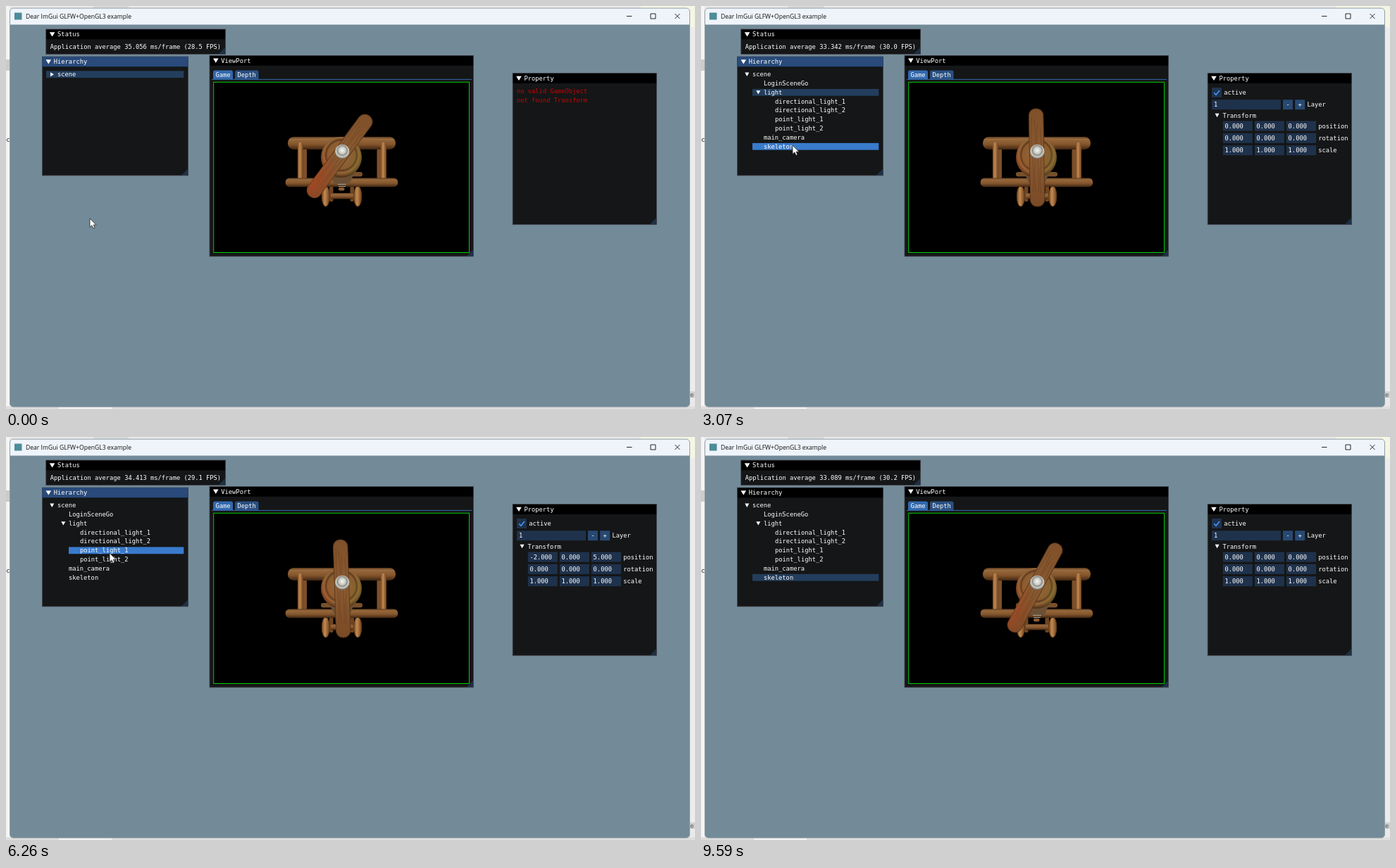
An HTML page that plays this animation: 978x573 px, repeating every 9.69 s.

```html
<!DOCTYPE html>
<html lang="en">
<head>
<meta charset="utf-8">
<title>Scene editor</title>
<style>
html, body { margin: 0; width: 978px; height: 573px; overflow: hidden; background: #e9e9e9; }
svg { display: block; }
text { font: 8.75px "DejaVu Sans Mono", monospace; white-space: pre; }
.caption { font: 8.6px "Open Sans", sans-serif; }
</style>
</head>
<body>
<svg id="stage" width="978" height="573" viewBox="0 0 978 573">
  <defs>
    <linearGradient id="wing" x2="0" y2="1">
      <stop offset="0" stop-color="#5f3d20"/><stop offset=".2" stop-color="#96683c"/>
      <stop offset=".6" stop-color="#84552c"/><stop offset="1" stop-color="#3f2612"/>
    </linearGradient>
    <linearGradient id="post">
      <stop offset="0" stop-color="#7b4b26"/><stop offset=".4" stop-color="#c48a50"/>
      <stop offset="1" stop-color="#6a4020"/>
    </linearGradient>
    <linearGradient id="wood" x2="0" y2="1">
      <stop offset="0" stop-color="#7f5029"/><stop offset=".5" stop-color="#8a5a32"/>
      <stop offset="1" stop-color="#7a4a26"/>
    </linearGradient>
    <radialGradient id="nose" cx=".5" cy=".45" r=".55">
      <stop offset="0" stop-color="#94683a"/><stop offset=".62" stop-color="#8a5c30"/>
      <stop offset=".68" stop-color="#5c3a1c"/><stop offset=".78" stop-color="#97683a"/>
      <stop offset="1" stop-color="#4a2c14"/>
    </radialGradient>
    <radialGradient id="hub" cx=".5" cy=".42" r=".55">
      <stop offset="0" stop-color="#f4f6f2"/><stop offset=".45" stop-color="#c4c6bf"/>
      <stop offset=".6" stop-color="#8d8a82"/><stop offset=".8" stop-color="#d0d2cb"/>
      <stop offset="1" stop-color="#77726a"/>
    </radialGradient>
    <radialGradient id="red" gradientUnits="userSpaceOnUse" cx="412" cy="236" r="58">
      <stop offset="0" stop-color="#d2401c" stop-opacity=".75"/>
      <stop offset="1" stop-color="#d2401c" stop-opacity="0"/>
    </radialGradient>
    <radialGradient id="green" gradientUnits="userSpaceOnUse" cx="543" cy="234" r="62">
      <stop offset="0" stop-color="#6c8420" stop-opacity=".75"/>
      <stop offset="1" stop-color="#6c8420" stop-opacity="0"/>
    </radialGradient>
    <clipPath id="bladeClip"><rect id="bladeMask"/></clipPath>
    <clipPath id="noseClip"><circle cx="476" cy="215" r="29"/></clipPath>
  </defs>
  <g id="desktop"></g>
  <g id="panels"></g>
  <g id="plane"></g>
  <g id="propeller">
    <g id="blade">
      <rect id="bladeBody" fill="url(#wood)" stroke="#5c381b"/>
      <path id="grain" fill="none" stroke="#5a3517" stroke-opacity=".45" stroke-width=".8"/>
    </g>
    <g clip-path="url(#bladeClip)">
      <path d="M350 130H600V300H350Z" fill="url(#red)"/>
      <path d="M350 130H600V300H350Z" fill="url(#green)"/>
    </g>
    <circle cx="477.3" cy="207" r="10.3" fill="url(#hub)"/>
  </g>
  <g id="live"></g>
  <path id="cursor" d="M0 0V12.6L2.9 9.9L4.9 14.3L7 13.4L5.1 9.2H9Z" fill="#fff" stroke="#222" stroke-width=".8"/>
</svg>
<script>
const $ = id => document.getElementById(id);
const LOOP = 9690;
const PANEL = '#151617', FRAME = '#1f324c', BUTTON = '#274972', HEADER = '#233e5d', HOVER = '#397bcc';

const rect = (x, y, w, h, fill, extra = '') =>
  `<rect x="${x}" y="${y}" width="${w}" height="${h}" fill="${fill}" ${extra}/>`;
const path = (d, fill, extra = '') => `<path d="${d}" fill="${fill}" ${extra}/>`;
const label = (x, y, s, fill = '#fff') => `<text x="${x}" y="${y + 3}" fill="${fill}">${s}</text>`;
const arrow = (x, y, open) => path(open
  ? `M${x - 3} ${y - 2.7}h6l-3 5.4Z` : `M${x - 2.3} ${y - 3}v6l5-3Z`, '#fff');
const titleBar = (x, y, w, name, fill = '#000') =>
  rect(x, y, w, 14.3, fill) + path(`M${x + 5} ${y + 4.2}h7.6l-3.8 6.2Z`, '#fff') + label(x + 16.3, y + 7.2, name);

function panel(x, y, w, h, name) {
  const r = x + w, b = y + h;
  return rect(x, y, w, h, PANEL) + titleBar(x, y, w, name) +
    path(`M${r} ${b - 10}V${b}h-10Z`, '#1e3045') +
    rect(x, y, w, h, 'none', 'stroke="#41414b" stroke-width=".8"');
}

$('desktop').innerHTML =
  rect(0, 0, 5, 573, '#f4f4f4') + rect(0, 76, 5, 16, '#cbcbcb') + rect(124, 0, 50, 3, '#d9d9d9') +
  rect(901, 0, 77, 30, '#f5f5e4') + rect(971, 30, 7, 520, '#ececec') + rect(971, 548, 7, 9, '#cfcfcf') +
  rect(0, 569, 978, 4, '#dedede') + rect(75, 570, 75, 3, '#f2f2f2') +
  label(-5, 190, '_c', '#222') + label(971, 553, 'e', '#555') +
  rect(5.5, 3, 965, 567, '#738b98', 'rx="5" stroke="#8b969c" stroke-width=".8"') +
  path('M6 26.5V8Q6 3.4 10.5 3.4H965.5Q970 3.4 970 8V26.5Z', '#eff4fa') +
  rect(12, 9.5, 10.5, 10, '#4d8c98') +
  '<text class="caption" x="28" y="18" fill="#111">Dear ImGui GLFW+OpenGL3 example</text>' +
  path('M881 14.5h7.5M915 11h7v7h-7ZM949.5 11l7 7m0-7l-7 7', 'none', 'stroke="#111" stroke-width=".9"');

$('panels').innerHTML =
  panel(56.8, 33, 254.7, 35.5, 'Status') + panel(51.5, 72, 207, 169, 'Hierarchy') +
  panel(289, 70.4, 374.4, 285.6, 'ViewPort') + panel(719.2, 95.6, 204.3, 215.2, 'Property') +
  path('M294 104V94q0-2.5 2.5-2.5h23q2.5 0 2.5 2.5v10Z', '#3369ad') +
  path('M325 104V94q0-2.5 2.5-2.5h28.5q2.5 0 2.5 2.5v10Z', '#2a5082') +
  rect(292, 103.9, 369, 1, '#3369ad') + label(297.5, 98, 'Game') + label(328.5, 98, 'Depth') +
  rect(294.7, 108.3, 362.8, 242.2, '#000', 'stroke="#04cc04"');

const bar = (x, y, w, h, fill, r = 2) => rect(x, y, w, h, fill, `rx="${r}"`);
const wheel = x => `<ellipse cx="${x}" cy="270.5" rx="5.6" ry="14.6" fill="url(#post)" stroke="#5a3719"/>`;
$('plane').innerHTML =
  bar(447, 236, 59, 6.5, '#76502b', 3) +
  bar(421, 203, 6, 43, '#7c4f29') + bar(526.5, 203, 5.5, 43, '#7c4f29') +
  bar(400, 186, 153, 18, 'url(#wing)', 8.5) +
  path('M404 189.5Q476 187 549 189.5', 'none', 'stroke="#a97a49" stroke-opacity=".6"') +
  bar(414, 194, 7.8, 53, 'url(#post)', 3) + bar(532, 194, 8, 53, 'url(#post)', 3) +
  bar(459, 252, 5.5, 26, '#6f4522') + bar(488.5, 252, 5.5, 26, '#6f4522') +
  bar(461, 266, 32, 8.5, 'url(#wing)') +
  wheel(453.8) + wheel(499.3) +
  bar(396.7, 244.5, 159.5, 12.8, 'url(#wing)', 6) +
  path('M459 238h35l-6 14q-11 3-22 0Z', '#6b5035') +
  path('M471 253.5h12M472 256.5h10', 'none', 'stroke="#aaa69d" stroke-width="1.2"') +
  bar(472, 258, 8.5, 4.5, '#8a5a30') +
  '<circle cx="476" cy="215" r="29" fill="url(#nose)"/>' +
  '<g clip-path="url(#noseClip)">' +
  rect(447, 186, 58, 58, 'url(#red)', 'opacity=".8"') + rect(447, 186, 58, 58, 'url(#green)') + '</g>';

// Time of every picture change: one still, then nine runs of eight steps.
const runs = [[150, 1090], [1210, 2110], [2260, 3200], [3320, 4250], [4370, 5340],
  [5480, 6380], [6530, 7430], [7580, 8570], [8690, 9590]];
const ticks = [0, ...runs.flatMap(([a, b]) => Array.from({ length: 8 }, (_, i) => a + (b - a) * i / 7))];

// time, unwound propeller angle, milliseconds per frame
const spin = [[0, 36.3, 35.056], [1720, 423.8, 33.903], [3070, 720, 33.34], [4370, 1016.2, 33.707],
  [6260, 1440, 34.416], [7430, 1710, 33.856], [9590, 2188.2, 33.089]];
const pointer = [[0, 119, 302], [300, 119, 302], [900, 65, 98], [1250, 65, 98], [1720, 83, 146],
  [2200, 80, 123], [2400, 80, 123], [3070, 130, 198], [3400, 138, 196], [4150, 145, 111], [4370, 145, 111],
  [4850, 145, 124], [5000, 145, 124], [5400, 146, 136], [5750, 147, 149], [6050, 147, 160], [6260, 147, 165],
  [6500, 147, 175], [6900, 145, 187], [7430, 144, 197], [7900, 144, 199], [8450, 152, 335],
  [8650, 152, 335], [9350, 190, 585]];

function sample(keys, t, ease = k => k) {
  const i = keys.findIndex(key => key[0] > t);
  if (i < 0) return keys.at(-1).slice(1);
  const a = keys[i - 1], b = keys[i], k = ease((t - a[0]) / (b[0] - a[0]));
  return a.slice(1).map((v, j) => v + (b[j + 1] - v) * k);
}
const smooth = k => k * k * (3 - 2 * k);

const OPEN_SCENE = 1000, OPEN_LIGHT = 2350, BLUR = 8500;
const nodes = [['scene', 0], ['LoginSceneGo', 1], ['light', 1], ['directional_light_1', 2],
  ['directional_light_2', 2], ['point_light_1', 2], ['point_light_2', 2], ['main_camera', 1], ['skeleton', 1]];
const picks = [[0, 'scene'], [OPEN_LIGHT, 'light'], [4150, 'LoginSceneGo'], [4850, 'light'],
  [5480, 'directional_light_1'], [5800, 'directional_light_2'], [6050, 'point_light_1'],
  [6530, 'point_light_2'], [6950, 'main_camera'], [7700, 'skeleton']];
const positions = { point_light_1: [-2, 0, 5], point_light_2: [2, 0, 5], main_camera: [0, 0, 10] };

function hierarchy(t, selected, px, py) {
  const depth = t < OPEN_SCENE ? 0 : t < OPEN_LIGHT ? 1 : 2;
  return nodes.filter(n => n[1] <= depth).map(([name, level], i) => {
    const y = 97.2 + 12.82 * i, x = 57 + 16 * level;
    const hover = px > x && px < 252 && Math.abs(py - y) < 6.4;
    const fill = hover ? HOVER : name === selected ? HEADER : '';
    const open = name === 'scene' ? depth > 0 : name === 'light' ? depth > 1 : null;
    return (fill && rect(x, y - 4.9, 252.3 - x, 9.8, fill)) +
      (open === null ? '' : arrow(x + 8.3, y, open)) + label(x + 16, y, name);
  }).join('');
}

function property(selected) {
  if (selected === 'scene')
    return label(725, 121, 'no valid GameObject', '#c80404') + label(725, 133.8, 'not found Transform', '#c80404');
  const rows = [['position', positions[selected] || [0, 0, 0]], ['rotation', [0, 0, 0]], ['scale', [1, 1, 1]]];
  return rect(725, 116, 14, 14, FRAME) +
    path('M728.3 123.2l2.7 3l5-6.3', 'none', 'stroke="#4296fa" stroke-width="1.6"') + label(742.2, 123, 'active') +
    rect(725, 133.2, 98, 14, FRAME) + label(728, 140.3, '1') +
    rect(826, 133.2, 14, 14, BUTTON) + label(830.4, 140.3, '-') +
    rect(843.2, 133.2, 14, 14, BUTTON) + label(847.6, 140.3, '+') + label(860.5, 140.3, 'Layer') +
    arrow(732.6, 155.5, true) + label(740.5, 155.5, 'Transform') +
    rows.map(([name, values], i) => {
      const y = 170.6 + 17.3 * i;
      return values.map((v, j) => rect(740.8 + 45.1 * j, y - 7, 42, 14, FRAME) +
        label(743.4 + 45.1 * j, y, v.toFixed(3))).join('') + label(876.3, y, name);
    }).join('');
}

function turnBlade(angle) {
  const a = angle * Math.PI / 180, c2 = Math.cos(a) ** 2;
  const half = 73.5 - 4 * c2, w = 11 - .8 * c2;
  const place = `translate(${476.5 - 3 * Math.sin(2 * a)} ${209.5 + 6 * c2}) rotate(${angle % 360})`;
  for (const id of ['bladeBody', 'bladeMask']) {
    const box = { x: -w, y: -half, width: 2 * w, height: 2 * half, rx: w - .5 };
    for (const k in box) $(id).setAttribute(k, box[k]);
  }
  $('blade').setAttribute('transform', place);
  $('bladeMask').setAttribute('transform', place);
}
$('grain').setAttribute('d', [-6, -2.5, 1.5, 5.5].map((x, i) =>
  `M${x} ${-58 + 5 * i}q${i % 2 ? 2 : -2} 30 0 55t0 ${52 - 4 * i}`).join(''));

function draw(t) {
  const [angle, ms] = sample(spin, t);
  const [x, y] = sample(pointer, t, smooth);
  const selected = picks.findLast(p => p[0] <= t)[1];
  turnBlade(angle);
  $('live').innerHTML =
    label(62.8, 58.2, `Application average ${ms.toFixed(3)} ms/frame (${(1000 / ms).toFixed(1)} FPS)`) +
    (t < BLUR ? titleBar(51.5, 72, 207, 'Hierarchy', '#294a7a') : '') +
    hierarchy(t, selected, x, y) + property(selected);
  $('cursor').setAttribute('transform', `translate(${x} ${y})`);
}

let shown = -1;
const start = performance.now();
function loop() {
  const t = (performance.now() - start) % LOOP;
  const step = ticks.findLastIndex(tick => tick <= t + 6);
  if (step !== shown) draw(ticks[shown = step]);
  requestAnimationFrame(loop);
}
loop();
</script>
</body>
</html>
```
